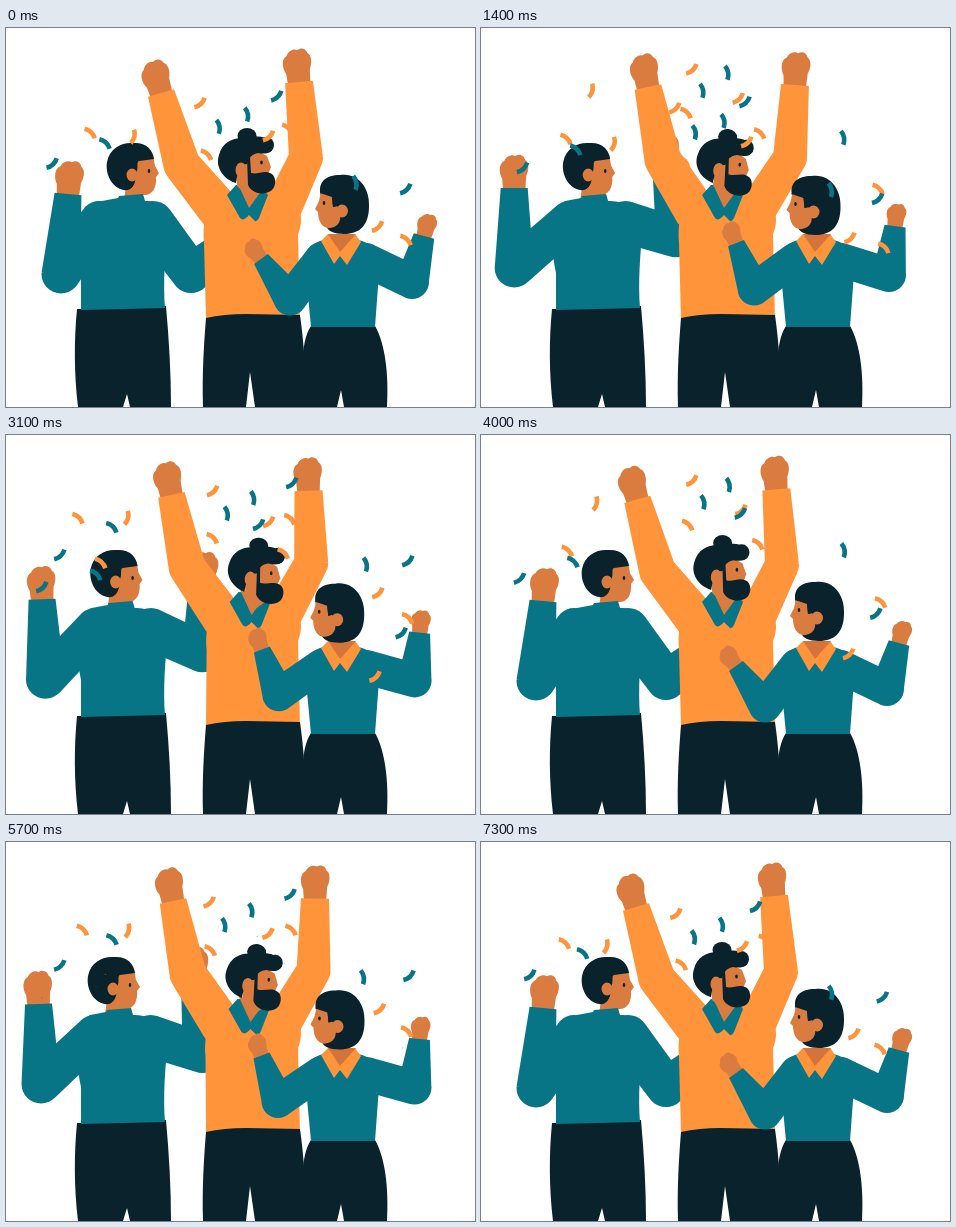
An HTML page for the animation above (7400 ms loop, 469x379 px).

```html
<!DOCTYPE html>
<html lang="en">
<head>
<meta charset="utf-8">
<title>Cheering team</title>
<style>
html, body { margin: 0; width: 100%; height: 100%; overflow: hidden; background: #fff; }
svg { display: block; width: 100%; height: 100%; }
</style>
</head>
<body>
<svg id="stage" viewBox="0 0 469 379" xmlns="http://www.w3.org/2000/svg"></svg>
<script>
const TEAL = '#087587', ORANGE = '#ff943a', DARK = '#0a222b', SKIN = '#da7c40', SHADE = '#d2743b';
const LOOP = 3700, STEP = 100;
const stage = document.getElementById('stage');

const r1 = n => Math.round(n * 10) / 10;
const smooth = (from, to, t) => {
  const u = Math.min(1, Math.max(0, (t - from) / (to - from)));
  return u * u * (3 - 2 * u);
};

// Everyone moves from a resting pose to a cheering pose, sways there and comes back.
function motion(t, wait) {
  const back = 1 - smooth(2950, 3600, t);
  return { cheer: smooth(wait, 1450, t) * back, sway: smooth(1400, 2600, t) * back };
}
const pose = (m, rest, cheer, sway = [0, 0]) =>
  rest.map((v, i) => v + (cheer[i] - v) * m.cheer + sway[i] * m.sway);

const shape = (d, fill) => `<path d="${d}" fill="${fill}"/>`;
const dot = (x, y, rx, ry, fill) => `<ellipse cx="${x}" cy="${y}" rx="${rx}" ry="${ry}" fill="${fill}"/>`;
const group = (x, y, turn, body) => `<g transform="translate(${r1(x)} ${r1(y)}) ${turn}">${body}</g>`;

function bone(a, b, wa, wb) {
  const dx = b[0] - a[0], dy = b[1] - a[1], len = Math.hypot(dx, dy);
  const side = (p, w) => [r1(p[0] - dy / len * w / 2), r1(p[1] + dx / len * w / 2)];
  return `M${side(a, wa)}L${side(b, wb)}L${side(b, -wb)}L${side(a, -wa)}Z`;
}
const knob = (p, r) => `M${r1(p[0] - r)} ${r1(p[1])}a${r} ${r} 0 1 0 ${2 * r} 0a${r} ${r} 0 1 0 ${-2 * r} 0Z`;

const FIST = 'M-11 4L-12 -9C-16 -16 -15 -25 -10 -27C-8 -32 -2 -34 1 -32C6 -35 10 -32 11 -28C15 -26 15 -18 12 -12L11 4Z';

function arm(shoulder, elbow, wrist, [ws, we, ww], fill, size = 1) {
  const turn = Math.atan2(wrist[0] - elbow[0], elbow[1] - wrist[1]) * 180 / Math.PI;
  return group(wrist[0], wrist[1], `rotate(${r1(turn)}) scale(${size})`, shape(FIST, SKIN))
    + shape(bone(shoulder, elbow, ws, we) + bone(elbow, wrist, we, ww)
      + knob(shoulder, ws / 2) + knob(elbow, we / 2), fill);
}

function drawLeft(t) {
  const m = motion(t, 500);
  const d = -12 * m.cheer;
  const torso = `M${113 + d} 168L${137 + d} 166L${139 + d} 173C${152 + d} 173 ${163 + d / 4} 178 162 200`
    + `C159 225 157 255 159 280L75 282L75 245C${72 + d / 4} 215 ${74 + d / 2} 182 ${96 + d} 173L${112 + d} 170Z`;
  const head = shape('M122 145L118 172L136 172L137 167C146 168 151 160 150 149L153 145L149 138L147 127L124 128Z', SKIN)
    + shape('M118 162C106 160 99 146 101 134C104 119 117 114 127 115C140 114 147 122 148 131L133 133C130 134 133 140 130 145L129 154C127 160 123 163 118 162Z', DARK)
    + dot(126, 147, 5.5, 6.5, SKIN) + dot(143, 143, 1.3, 2, DARK);
  return arm([147 + d / 5, 194], pose(m, [185, 245], [195, 209], [3, 4]),
      pose(m, [222, 215], [186, 137], [8, 3]), [42, 40, 30], TEAL)
    + shape('M71 281L160 278C163 312 165 345 165 379H124L121 366L117 379H72C68 345 68 312 71 281Z', DARK)
    + group(-19 * m.cheer, 0, '', head)
    + shape(torso, TEAL)
    + arm([93 + d * .4, 192], pose(m, [55, 246], [33, 240], [4, 4]),
      pose(m, [62, 166], [33, 160], [-1, 4]), [38, 39, 27], TEAL);
}

function drawMiddle(t) {
  const m = motion(t, 0);
  const d = 3 * m.sway;
  const torso = `M${214 + d} 160C${203 + d} 172 ${196 + d} 190 ${198 + d} 215L200 292H294`
    + `L292 206C300 188 292 166 ${268 + d} 158L${243 + d} 180Z`;
  const collar = shape('M230 157L221 167L234 190Q237 194 243 187L249 193Q251 194 253 190L262 167L255 158Z', TEAL)
    + shape('M231 154L256 162L243 180Z', SKIN);
  const head = shape('M230 136L231 158L244 170L256 160L262 147L265 139L261 128L250 122Z', SKIN)
    + shape('M230 155C217 151 209 139 213 127C216 115 226 110 236 110C250 106 265 109 267 117C268 124 261 127 252 125Q246 126 243 131L241 136L233 137Z', DARK)
    + dot(241, 108, 9.5, 8, DARK) + dot(260, 117, 8, 8, DARK)
    + shape('M241 129L244 129L245 145C251 147 258 142 264 145C270 147 271 157 266 162C259 168 246 166 242 157Z', DARK)
    + dot(235, 142, 5.5, 7.5, SKIN) + dot(255.5, 134.5, 1.3, 2, DARK);
  const [hx, hy] = pose(m, [0, 0], [2, 1], [8, 2]);
  return shape(torso, ORANGE)
    + shape('M200 290Q218 286 240 286L294 287C298 315 300 348 300 379H249L244 344L240 379H197C196 345 198 315 200 290Z', DARK)
    + arm([214 + d, 183], pose(m, [176, 137], [182, 132]), pose(m, [155, 65], [167, 59]), [42, 37, 27], ORANGE)
    + arm([276, 182], pose(m, [300, 130], [309, 130], [-3, -2]),
      pose(m, [293, 54], [314, 57], [-10, -1]), [38, 34, 28], ORANGE)
    + group(d, 0, '', collar)
    + group(hx, hy, `rotate(${r1(5 * m.cheer)} 242 150)`, head);
}

function drawRight(t) {
  const m = motion(t, 500);
  const torso = 'M318 212C306 214 299 224 299 236L305 299H369L373 245C375 228 370 216 352 212Z';
  const collar = shape('M322 206L315 213L328 236L334 228L341 237L355 214L349 206Z', ORANGE)
    + shape('M322 206H350L334 224Z', SHADE);
  const head = shape('M315 168C311 154 320 147 334 147C352 144 364 160 363 178C363 197 354 206 338 206C328 206 321 203 320 197Z', DARK)
    + shape('M315 164L313 173L309 181L312 184C312 196 319 203 328 199C333 197 335 192 334 186L331 178L327 179L326 168Z', SKIN)
    + shape('M317 154L314 165L326 169L327 179L336 177V150Z', DARK)
    + dot(336, 183, 6, 6.5, SKIN) + dot(318, 175, 1.3, 2, DARK);
  const [hx, hy] = pose(m, [0, 0], [-3.5, 1], [-2, 1]);
  return shape('M305 298H369C379 315 383 346 381 379H338L335 362L331 379H298C297 350 293 316 305 298Z', DARK)
    + arm([360, 232], pose(m, [406, 254], [408, 247], [1, -3]),
      pose(m, [418, 208], [414, 198], [-1, -2]), [34, 34, 21], TEAL, .68)
    + shape(torso, TEAL)
    + arm([315, 230], pose(m, [284, 271], [273, 261], [-2, -3]),
      pose(m, [255, 231], [255, 215], [1, -3]), [32, 33, 17], TEAL, .66)
    + collar + group(hx, hy, '', head);
}

// Two confetti bursts, each three times per loop: colour, fall from, fall to, tilt.
const LIFE = 1300, CYCLE = LOOP / 3;
const bursts = [
  { at: 150, bits: [
    [ORANGE, [110, 62], [134, 118], -76],
    [ORANGE, [211, 41], [194, 82], -43],
    [TEAL, [221, 62], [214, 106], 80],
    [TEAL, [246, 44], [243, 95], 80],
    [ORANGE, [205, 84], [203, 135], 43],
    [ORANGE, [257, 70], [267, 116], -43],
    [TEAL, [362, 109], [350, 164], 80],
    [ORANGE, [397, 160], [404, 222], 43]
  ] },
  { at: 630, bits: [
    [ORANGE, [72, 83], [97, 130], 43],
    [TEAL, [106, 92], [90, 142], 43],
    [TEAL, [54, 120], [36, 154], -43],
    [TEAL, [286, 48], [252, 92], -43],
    [ORANGE, [284, 84], [278, 120], 43],
    [TEAL, [402, 126], [396, 202], -43],
    [ORANGE, [372, 158], [370, 246], -43]
  ] }
];

function ribbon([color, from, to, tilt], age) {
  const u = age / LIFE, size = Math.min(1, (age + 80) / 80, (LIFE + 80 - age) / 80);
  if (size <= 0) return '';
  const x = from[0] + (to[0] - from[0]) * u + 3 * Math.sin(u * 2 * Math.PI);
  const y = from[1] + (to[1] - from[1]) * u;
  const bend = tilt > 0 ? -1 : 1;
  return group(x, y, `rotate(${tilt}) scale(${r1(size)})`,
    `<path d="M-7 ${-bend}Q0 ${3 * bend} 7 ${-bend}" fill="none" stroke="${color}" stroke-width="4.6"/>`);
}

function drawConfetti(t) {
  let out = '';
  for (const { at, bits } of bursts)
    for (let i = 0; i < 3; i++) {
      const age = (t - at - i * CYCLE + 80 + LOOP) % LOOP - 80;
      for (const bit of bits) out += ribbon(bit, age);
    }
  return out;
}

let shown = -1;
function render(ms) {
  const t = Math.floor(ms / STEP) * STEP % LOOP;
  if (t === shown) return;
  shown = t;
  stage.innerHTML = drawLeft(t) + drawMiddle(t) + drawRight(t) + drawConfetti(t);
}

const start = performance.now();
function tick() {
  render(performance.now() - start);
  requestAnimationFrame(tick);
}
tick();
</script>
</body>
</html>
```
